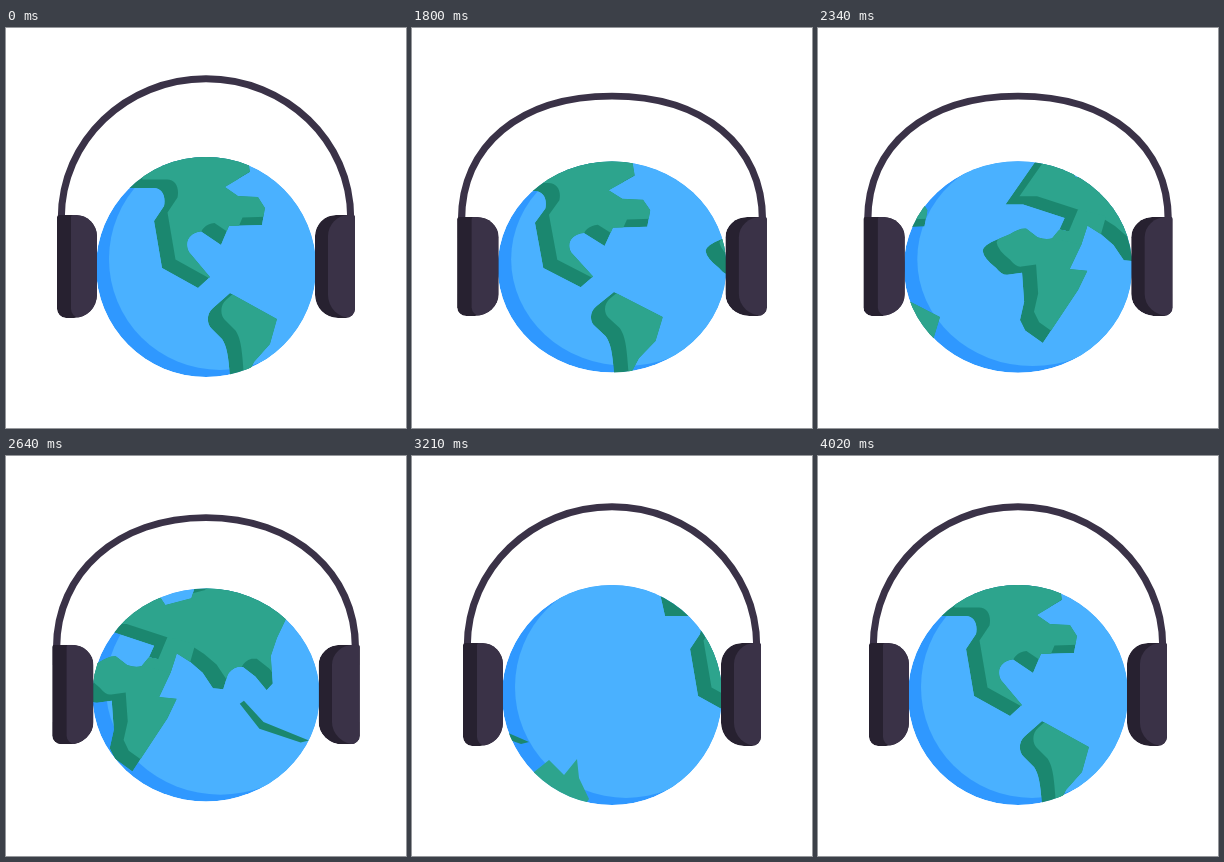
Recreate the animation shown at these times as an HTML page. Size 400x400 px, loop 4050 ms.

```html
<!DOCTYPE html>
<html lang="en">
<head>
<meta charset="utf-8">
<title>Globe with headphones</title>
<style>
  html, body { margin: 0; width: 100%; height: 100%; overflow: hidden; background: #fff; }
  svg { display: block; width: 100vw; height: 100vh; }
</style>
</head>
<body>
<svg viewBox="0 0 400 400">
  <defs>
    <clipPath id="disc"><circle cx="200" cy="239" r="110"/></clipPath>
    <g id="land"></g>
  </defs>
  <g id="body">
    <path id="band" fill="none" stroke="#3a3247" stroke-width="7"/>
    <g clip-path="url(#disc)">
      <circle cx="200" cy="239" r="110" fill="#2f98ff"/>
      <circle cx="214" cy="231" r="111" fill="#4ab1ff"/>
      <g id="map">
        <use href="#land"/>
        <use href="#land" x="554"/>
      </g>
    </g>
  </g>
</svg>
<script>
const LOOP = 4050, STEP = 30;
const SPIN_START = 1500, SPIN_TIME = 2495, MAP_WIDTH = 554;
const CX = 200, CY = 239;
const GREEN = '#2da48d', DEEP = '#1b876f', SHELL = '#3a3247', SHADE = '#272130';

// Start and end of each bounce.
const BEATS = [[1505, 2000], [2000, 2570], [2570, 3120], [3210, 3770]];
const DROP_TIME = 170, REBOUND_TIME = 60;
const SQUASH = .054, BAND_DROP = 18, BAND_REBOUND = 8.5;

const $ = id => document.getElementById(id);

function add(parent, tag, attrs) {
  const el = document.createElementNS('http://www.w3.org/2000/svg', tag);
  for (const name in attrs) el.setAttribute(name, attrs[name]);
  return parent.appendChild(el);
}

const plain = (parent, d, fill) => add(parent, 'path', { d, fill });

// A dark shape, lit by a shifted copy of itself.
let clips = 0;
function shaded(parent, d, dark, light, dx, dy) {
  const id = 'clip' + clips++;
  add(add(document.querySelector('defs'), 'clipPath', { id }), 'path', { d });
  const g = add(parent, 'g', { 'clip-path': `url(#${id})` });
  plain(g, d, dark);
  plain(g, d, light).setAttribute('transform', `translate(${dx} ${dy})`);
}

const AMERICA_NORTH = `M114 120L123 160H146C156 159 160 168 158 178L148 193L156 240L192 260
  L204 249L183 224C178 214 183 205 195 203.500L215 217L223 198L256 197L259 180L252 169L232 168
  L219 159L244 144L238 105Z`;
const AMERICA_SOUTH = `M224 265L207 280C200 286 201 296 205 300L216 311C222 320 223 333 225 365
  H233L248 334L264 316L271 291Z`;
const EURASIA = `M334 174L385 95L397 138L402 146L427 139L440 95H540L519 160L510 180L504 199
  L506 227L500 234L489 220L477 210H472Q465 212 462 219L458 233L448 232L438 216L426 205
  L413 196L395 202L386 200L391 188L351 174Z`;
const AFRICA = `M354 199L365 208Q373 211 379 209L386 200L395 202L413 196L407 216L396 241L413 243
  L404 263L370 318L353 305L348 294L352 275L350 245L336 247Q331 248 325 240Q313 230 312 222
  Q313 216 327 210L338 205Q348 198 354 199Z`;
const ARABIA = 'M379 209L386 200L395 202L404 179L431 186L426 205L413 196L407 216Z';
const AUSTRALIA = 'M546 316L561 304L576 319L589 303L591 322L601 343L590 360L545 335Z';
const ISLANDS = 'M275 125H289L282 139L277 138ZM474 248L478 245L497 267L541 286L533 288L493 274Z';

for (const d of [AMERICA_NORTH, AMERICA_SOUTH, EURASIA, AFRICA])
  shaded($('land'), d, DEEP, GREEN, 13.5, -8.5);
plain($('land'), ARABIA, GREEN);
plain($('land'), AUSTRALIA, GREEN);
plain($('land'), ISLANDS, DEEP);

// Ear cup, mirrored for the right side.
function cup(x, sweep) {
  const arc = (r, px, y) => `A${r} ${r} 0 0 ${sweep} ${x(px)} ${y}`;
  return `M${x(53)} 187H${x(70)}${arc(21, 91, 208)}V267${arc(23, 68, 290)}`
    + `H${x(60)}${arc(9, 51, 281)}V189${arc(2, 53, 187)}Z`;
}
shaded($('body'), cup(x => x, 1), SHADE, SHELL, 14, 0);
shaded($('body'), cup(x => 400 - x, 0), SHADE, SHELL, 13, 0);

// Squash and band drop: a quick fall, a slower rise, then the band rebounds.
function bounce(t) {
  const beat = BEATS.find(([from, to]) => t >= from && t < to);
  if (!beat) return { squash: 0, drop: 0 };
  const dt = t - beat[0], hit = beat[1] - beat[0] - REBOUND_TIME;
  if (dt >= hit)
    return { squash: 0, drop: -BAND_REBOUND * Math.sin(Math.PI * (dt - hit) / REBOUND_TIME) };
  const fall = Math.sin(Math.PI / 2 * Math.min(1, dt / DROP_TIME));
  const v = Math.max(0, (dt - DROP_TIME) / (hit - DROP_TIME));
  const rise = power => Math.cos(Math.PI / 2 * v ** power);
  return { squash: SQUASH * fall * rise(1), drop: BAND_DROP * fall * rise(2.5) };
}

function draw(t) {
  const { squash, drop } = bounce(t);
  const sy = 1 - squash;
  $('body').setAttribute('transform',
    `translate(${CX} ${CY}) scale(${1 + squash} ${sy}) translate(${-CX} ${-CY})`);

  // The handles keep their length, so the arch flattens as it drops.
  const top = CY + (50.7 + drop - CY) / sy;
  const reach = 80 + drop / 2;
  $('band').setAttribute('d', `M55.300 190C55.300 113 ${CX - reach} ${top} ${CX} ${top}`
    + `S344.700 113 344.700 190`);

  const u = Math.min(1, Math.max(0, (t - SPIN_START) / SPIN_TIME));
  $('map').setAttribute('transform', `translate(${-MAP_WIDTH * u * u * (3 - 2 * u)} 0)`);
}

const start = performance.now();
function tick() {
  const t = (performance.now() - start) % LOOP;
  draw(Math.floor(t / STEP) * STEP);
  requestAnimationFrame(tick);
}
tick();
</script>
</body>
</html>
```
